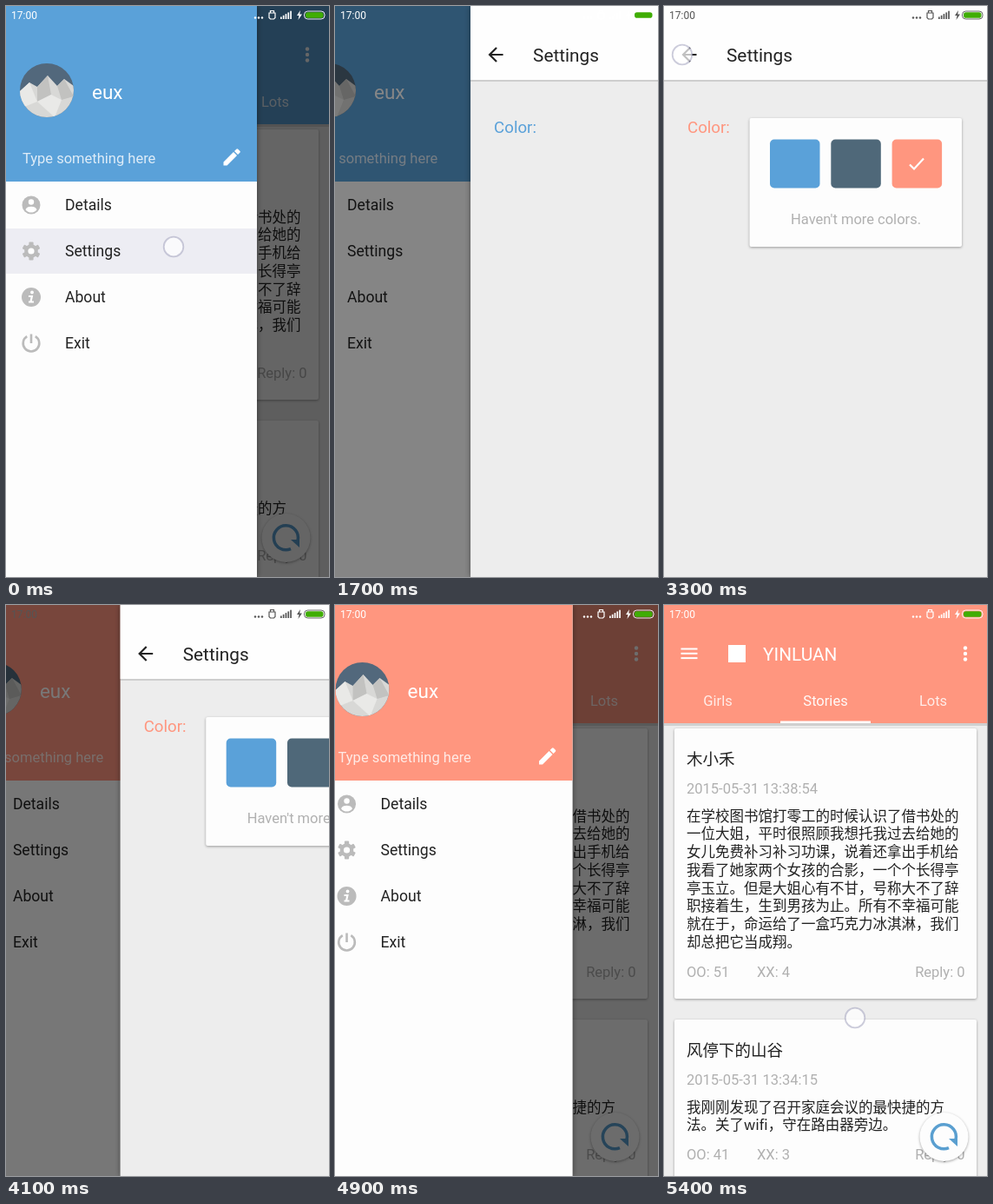
An HTML page for the animation above (5600 ms loop, 372x657 px).

```html
<!DOCTYPE html>
<html lang="en">
<head>
<meta charset="utf-8">
<title>Theme settings</title>
<style>
html, body { margin: 0; width: 100%; height: 100%; overflow: hidden; background: #ededed; }
svg { display: block; width: 100vw; height: 100vh; }
text { font-family: Roboto, "Noto Sans CJK SC", "Noto Sans CJK", sans-serif; font-size: 16.5px; }
.theme { fill: var(--theme); }
.title { font-size: 20.8px; }
.menu { font-size: 17.6px; fill: #222; }
.story { font-family: "Noto Sans CJK SC", "Noto Sans CJK", sans-serif; fill: #222; }
.head { font-size: 18.5px; }
.meta { fill: #b0b0b0; }
.card { fill: #fdfdfd; filter: drop-shadow(0 1px 1.5px rgba(0, 0, 0, .35)); }
.line { fill: none; stroke: currentColor; }
</style>
</head>
<body>
<svg id="stage" viewBox="0 0 372 657" preserveAspectRatio="none"></svg>
<script>
const W = 372, H = 657, DRAWER = 289, LOOP = 5600, STEP = 100;
const BLUE = '#5aa1d9', SLATE = '#4f6879', CORAL = '#ff967f';

const text = (x, y, s, cls = '', extra = '') =>
  `<text x="${x}" y="${y}" class="${cls}" ${extra}>${s}</text>`;
const rect = (x, y, w, h, extra = '') =>
  `<rect x="${x}" y="${y}" width="${w}" height="${h}" ${extra}/>`;
const circle = (x, y, r, extra = '') => `<circle cx="${x}" cy="${y}" r="${r}" ${extra}/>`;

const stories = [
  { y: 142, h: 311, name: '木小禾', time: '13:38:54', oo: 51, xx: 4, lines: [
    '在学校图书馆打零工的时候认识了借书处的', '一位大姐，平时很照顾我想托我过去给她的',
    '女儿免费补习补习功课，说着还拿出手机给', '我看了她家两个女孩的合影，一个个长得亭',
    '亭玉立。但是大姐心有不甘，号称大不了辞', '职接着生，生到男孩为止。所有不幸福可能',
    '就在于，命运给了一盒巧克力冰淇淋，我们', '却总把它当成翔。'] },
  { y: 477, h: 187, name: '风停下的山谷', time: '13:34:15', oo: 41, xx: 3, lines: [
    '我刚刚发现了召开家庭会议的最快捷的方', '法。关了wifi，守在路由器旁边。'] }
];

function storyCard({ y, h, name, time, oo, xx, lines }) {
  const foot = y + 120 + lines.length * 20.7;
  return rect(12, y, 348, h, 'rx="2" class="card"')
    + text(26, y + 41.5, name, 'story head')
    + text(26, y + 74.5, '2015-05-31 ' + time, 'meta')
    + lines.map((s, i) => text(26, y + 106.7 + i * 20.7, s, 'story')).join('')
    + text(26, foot, 'OO: ' + oo, 'meta') + text(107, foot, 'XX: ' + xx, 'meta')
    + text(346.5, foot, 'Reply: 0', 'meta', 'text-anchor="end"');
}

function homePage() {
  const tabs = ['Girls', 'Stories', 'Lots'].map((s, i) =>
    text(62 + 124 * i, 116, s, '', `text-anchor="middle" fill="#fff" fill-opacity="${i === 1 ? .95 : .82}"`));
  return rect(0, 0, W, H, 'fill="#ededed"')
    + stories.map(storyCard).join('')
    + rect(0, 136, W, 3, 'fill="#000" opacity=".12"')
    + rect(0, 0, W, 136, 'class="theme"')
    + [50.5, 55.8, 61.1].map(y => rect(19.5, y - 1, 19, 2, 'fill="#fff"')).join('')
    + rect(74, 46, 20, 20, 'fill="#fff"')
    + text(114, 63.5, 'YINLUAN', 'title', 'fill="#fff"')
    + [49.5, 56, 62.5].map(y => circle(347, y, 2.2, 'fill="#fff"')).join('')
    + tabs.join('')
    + rect(134, 133.5, 104, 2.5, 'fill="#fff"')
    + circle(322.5, 612, 28, 'class="card"')
    + `<path class="line" color="#5a9fd0" stroke-width="3.5" d="M328 624.6A14 14 0 1 1 336 615"/>
       <path fill="#5a9fd0" d="M328 614h10v9z"/>`;
}

const icons = [
  circle(0, 0, 10.5) + '<g fill="#fff"><circle cy="-3.5" r="3.2"/><path d="M-6.5 5.2C-5 .7 5 .7 6.5 5.2A8 8 0 0 1-6.5 5.2z"/></g>',
  [0, 60, 120].map(a => rect(-2.6, -10.5, 5.2, 21, `rx="1" transform="rotate(${a})"`)).join('')
    + circle(0, 0, 7.8) + circle(0, 0, 3.6, 'fill="#fff"'),
  circle(0, 0, 11) + '<g fill="#fff"><circle cx="1" cy="-5.5" r="1.9"/><path d="M-3-2H2.2L.8 4.5H3V6.5H-3V4.5H-1.4L-.5 0H-3z"/></g>',
  '<path class="line" stroke-width="2.6" d="M-4.8-7.8A9.3 9.3 0 1 0 4.8-7.8M0-10.5V0"/>'
];

function drawer() {
  const items = ['Details', 'Settings', 'About', 'Exit'].map((s, i) => {
    const y = 229 + 53 * i;
    return `<g transform="translate(29 ${y})" fill="#bbb" color="#bbb">${icons[i]}</g>`
      + text(68, y + 6.3, s, 'menu');
  });
  return rect(0, 0, DRAWER, H, 'fill="#fdfdfd" filter="url(#edge)"')
    + rect(0, 0, DRAWER, 202, 'class="theme"')
    + `<g clip-path="url(#face)">
      ${rect(16, 66, 62, 62, 'fill="#52687c"')}
      <path fill="#d8d8d6" d="M16 98l11-10 9 5 12-13 11 12 8-8 11 8v36H16z"/>
      <path fill="#c2c2c0" d="M36 93l12-13 4 22-16 8zM59 92l8-8 11 20-14 4z"/>
      <path fill="#e9e9e7" d="M16 98l11-10 9 22-20 8zM52 102l12 6-8 20-20-18z"/></g>`
    + text(99, 107, 'eux', '', 'fill="#fff" style="font-size:22.5px"')
    + text(19, 181, 'Type something here', '', 'fill="#fff" fill-opacity=".8"')
    + '<path fill="#fff" d="M250.5 179.5v4h4l11.5-11.5-4-4zM263 167l4 4 2.3-2.3q1-1 0-2l-2-2q-1-1-2 0z"/>'
    + rect(0, 256, DRAWER, 52, 'id="press" fill="#ededf3"')
    + items.join('');
}

function settingsPage() {
  const swatches = [BLUE, SLATE, CORAL].map((c, i) =>
    rect(122 + 70.3 * i, 153.5, 57.5, 56, `rx="5" fill="${c}"`));
  return rect(0, 0, W, H, 'fill="#ededed" filter="url(#edge)"')
    + rect(0, 85, W, 2, 'fill="#000" opacity=".13"')
    + rect(0, 0, W, 85, 'fill="#fefefe"')
    + '<path class="line" color="#222" stroke-width="2.2" d="M37.5 56H22.5M30 48l-8 8 8 8"/>'
    + text(72, 63.5, 'Settings', 'title', 'fill="#222"')
    + text(27, 146, 'Color:', 'theme', 'style="font-size:18.7px"')
    + `<g id="palette">${rect(98.5, 129, 244.5, 148, 'rx="2" class="card"')}${swatches.join('')}
       <path id="check" class="line" color="#fff" stroke-width="2.2" d="M-8 1l5 5L8-6"/>`
    + text(146, 251, "Haven't more colors.", 'meta') + '</g>';
}

function statusBar() {
  const bars = [0, 1, 2, 3, 4].map(i => rect(316 + 2.8 * i, 12.5 - 1.7 * i, 1.7, 2.5 + 1.7 * i));
  return `<g id="ink" fill="currentColor">
    ${text(6, 15, '17:00', '', 'style="font-size:12px"')}
    ${[287, 291, 295].map(x => circle(x, 13.5, 1.2)).join('')}
    <path class="line" stroke-width="1.2" d="M303 8h7v5.5l-1.5 1.5h-4l-1.5-1.5zM304.5 8V5.5h4V8"/>
    ${bars.join('')}<path d="M339 5l-4 6h2.5l-1 5 4.5-6.5h-2.8z"/>
    ${rect(343.5, 6, 23.5, 9, 'rx="4" class="line" stroke-width=".9"')}</g>
    ${rect(345, 7.3, 20.5, 6.4, 'rx="2.8" fill="#40ad05"')}`;
}

const stage = document.getElementById('stage');
stage.innerHTML = `<defs>
  <clipPath id="face">${circle(47, 97, 31)}</clipPath>
  <filter id="edge" x="-10%" width="120%" y="0" height="100%">
    <feDropShadow dx="0" dy="0" stdDeviation="3" flood-opacity=".45"/></filter></defs>
  <g id="under"><g>${homePage()}</g>${rect(0, 0, W, H, 'id="scrim"')}<g id="drawer">${drawer()}</g></g>
  ${rect(0, 0, W, H, 'id="dim"')}
  <g id="settings">${settingsPage()}</g>
  <g id="status">${statusBar()}</g>
  <g id="touch">${circle(0, 0, 11.3, 'fill="#fff" fill-opacity=".72" stroke="#9a9ab8" stroke-opacity=".5" stroke-width="1.8"')}</g>`;

const $ = id => document.getElementById(id);
const el = Object.fromEntries(['under', 'scrim', 'drawer', 'press', 'dim', 'settings', 'palette',
  'check', 'status', 'ink', 'touch'].map(id => [id, $(id)]));

// start, end, x, y of each press
const touches = [[0, 900, 193, 277], [2200, 3100, 300, 176], [3200, 3900, 21, 56], [5300, LOOP, 220, 475]];

const glide = (t, start) => {
  const u = Math.min(1, Math.max(0, (t - start) / 350));
  return (1 - Math.cos(Math.PI * u)) / 2;
};
const move = (node, x, y = 0) => node.setAttribute('transform', `translate(${x} ${y})`);
const show = (node, on) => node.setAttribute('visibility', on ? 'inherit' : 'hidden');

function render(t) {
  const push = glide(t, 1507) - glide(t, 3958);
  const open = 1 - glide(t, 4848);
  const coral = t >= 3100;

  stage.style.setProperty('--theme', coral ? CORAL : BLUE);
  move(el.under, -W / 4 * push);
  el.dim.setAttribute('opacity', .82 * push);
  move(el.settings, W * (1 - push));
  show(el.settings, push > .001);
  show(el.palette, t >= 1800);
  move(el.check, coral ? 291 : 150.5, 181.5);

  move(el.drawer, DRAWER * (open - 1));
  show(el.drawer, open > .001);
  el.scrim.setAttribute('opacity', .6 * open ** .8);
  show(el.press, t < 1400);

  show(el.status, t < 4200 || t >= 4400);
  el.ink.setAttribute('color', t >= 1900 && t < 4400 ? '#555' : '#fff');

  const hit = touches.find(([from, to]) => t >= from && t < to);
  show(el.touch, hit);
  if (hit) move(el.touch, hit[2], hit[3]);
}

const begin = performance.now();
function tick() {
  const t = (performance.now() - begin) % LOOP;
  render(Math.floor(t / STEP) * STEP);
  requestAnimationFrame(tick);
}
tick();
</script>
</body>
</html>
```
